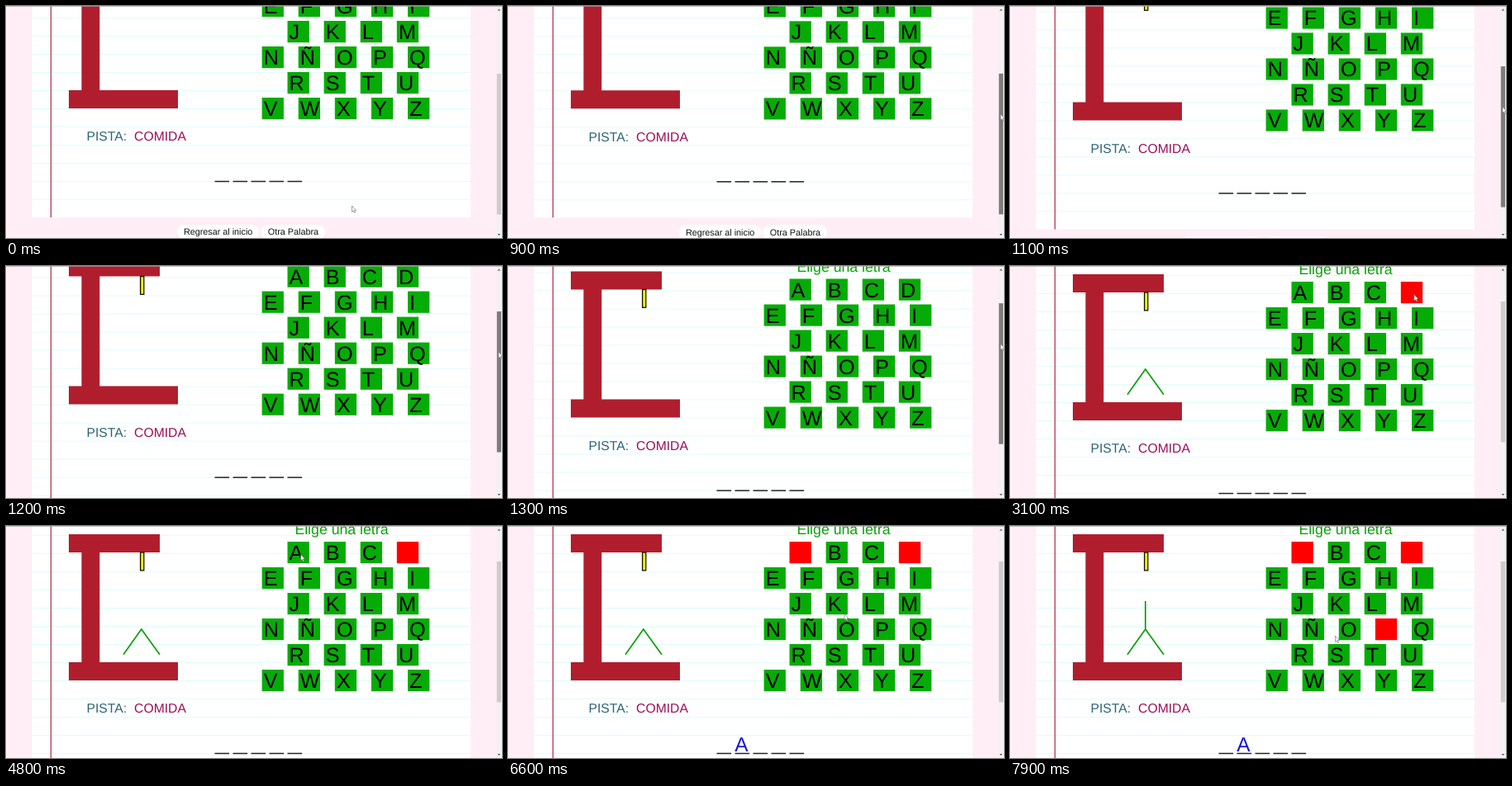
Write an HTML page that moves like this. It is 600 px wide and 281 px high and loops after 8 s.

```html
<!DOCTYPE html>
<html lang="es">
<head>
<meta charset="utf-8">
<title>Ahorcado</title>
<style>
  html, body { margin: 0; width: 100%; height: 100%; overflow: hidden; background: #ffeef5; }
  svg { display: block; width: 100vw; height: 100vh; }
  text { font-family: "Liberation Sans", Arial, sans-serif; white-space: pre; text-rendering: geometricPrecision; }
</style>
</head>
<body>
<svg viewBox="0 0 600 281">
  <rect width="600" height="281" fill="#ffeef5"/>
  <g id="page">
    <rect x="31.5" y="-20" width="530.5" height="339" fill="#fff"/>
    <g id="rules" stroke="#dffcfc"></g>
    <path d="M54.4-20V319" stroke="#b3304a" stroke-width="1.2"/>
    <path d="M76 10H186V32H113.3V165H208V187H76V165H91.4V32H76Z" fill="#b01e2e"/>
    <rect x="162.6" y="32" width="4.2" height="21.8" fill="#ffee1c" stroke="#111" stroke-width="1.3"/>
    <g fill="none" stroke="#0aa00a" stroke-width="1.7">
      <path id="legs" d="M142 155.7L163.8 125L186 155.7"/>
      <path id="torso" d="M163.8 91V125"/>
    </g>
    <text x="349.4" y="10" font-size="17.7" fill="#0aa00a">Elige una letra</text>
    <g id="keys" font-size="25.2"></g>
    <g font-size="15.7">
      <text x="97.5" y="226.3" fill="#2b6475">PISTA:</text>
      <text x="155.1" y="226.3" fill="#9b0d5a">COMIDA</text>
    </g>
    <g id="blanks" stroke="#222" stroke-width="1.5"></g>
    <text id="guess" x="274.3" y="272.8" font-size="24.4" fill="#1414dc">A</text>
    <g fill="#fff">
      <rect x="207" y="328" width="99" height="17.5" rx="8.7"/>
      <rect x="308" y="328" width="78" height="17.5" rx="8.7"/>
    </g>
    <g font-size="10.8" text-anchor="middle" fill="#111">
      <text x="256.6" y="340.3">Regresar al inicio</text>
      <text x="347.4" y="340.3">Otra Palabra</text>
    </g>
  </g>
  <rect x="592.8" width="7.2" height="281" fill="#f3f1f2"/>
  <path d="M594.6 5.4l1.8-2 1.8 2zM594.6 276l1.8 2 1.8-2z" fill="#555"/>
  <rect id="thumb" x="593.8" width="5.2" height="170.5"/>
  <rect width="600" height=".7" fill="#a5a2a3"/>
  <path id="cursor" d="M0 0V7.4L1.7 6L2.9 8.6L4.1 8L2.9 5.5H5.1Z" fill="#fff" stroke="#666" stroke-width=".6"/>
</svg>
<script>
const $ = id => document.getElementById(id);
const LOOP = 8000, STEP = 100, SCROLL = 63;
const pickTimes = { D: 3100, A: 5100, P: 7500 };
const partTimes = { legs: pickTimes.D, guess: pickTimes.A, torso: pickTimes.P };

function add(parent, tag, attrs, text) {
  const node = document.createElementNS("http://www.w3.org/2000/svg", tag);
  for (const name in attrs) node.setAttribute(name, attrs[name]);
  if (text) node.textContent = text;
  parent.append(node);
  return node;
}

for (let y = 11.5; y < 319; y += 22) add($("rules"), "path", { d: `M31.5 ${y}H562` });
for (let i = 0; i < 5; i++) add($("blanks"), "path", { d: `M${252.5 + 22 * i} 275.5h17.6` });

const keys = {};
["ABCD", "EFGHI", "JKLM", "NÑOPQ", "RSTU", "VWXYZ"].forEach((row, r) => {
  [...row].forEach((letter, c) => {
    const x = (row.length === 4 ? 340.5 : 309.6) + 44.1 * c;
    const y = 19 + 31 * r;
    keys[letter] = {
      x, y,
      tile: add($("keys"), "rect", { x, y, width: 26.3, height: 26.2 }),
      label: add($("keys"), "text", { x: x + 2.1, y: y + 22 }, letter)
    };
  });
});

const clamp = v => Math.min(1, Math.max(0, v));
const show = (node, on) => node.setAttribute("visibility", on ? "visible" : "hidden");

// Dragging the scrollbar follows an S-curve.
const scrollAt = t => -SCROLL / (1 + Math.exp((t - 1160) / 49.4));
const thumbAt = t => 43 - scrollAt(t) * 0.62;

function cursorAt(t) {
  let x = 418.5, y = 242;
  const move = (start, end, toX, toY) => {
    const k = clamp((t - start) / (end - start));
    x += (toX - x) * k;
    y += (toY - y) * k;
  };
  const moveToKey = (start, end, { x, y }) => move(start, end, x + 16, y + 15.5);

  move(0, 500, 595.8, thumbAt(t) + 49);
  moveToKey(1500, 2300, keys.D);
  move(3500, 4100, 420, 120);
  moveToKey(4100, 4800, keys.A);
  move(5800, 6600, 407, 106.5);
  moveToKey(6700, 7200, keys.P);
  move(7600, 7900, 393.5, 133);
  return [x, y];
}

function draw(t) {
  const dragging = t >= 600 && t < 1600;
  $("page").setAttribute("transform", `translate(0 ${scrollAt(t)})`);
  $("thumb").setAttribute("y", thumbAt(t));
  $("thumb").setAttribute("fill", dragging ? "#7c7c7c" : "#cdcbcc");
  $("cursor").setAttribute("transform", `translate(${cursorAt(t)})`);

  for (const letter in keys) {
    const used = t >= pickTimes[letter];
    keys[letter].tile.setAttribute("fill", used ? "#ff0000" : "#06ac06");
    show(keys[letter].label, !used);
  }
  for (const id in partTimes) show($(id), t >= partTimes[id]);
}

function tick() {
  const t = performance.now() % LOOP;
  draw(Math.floor(t / STEP) * STEP);
  requestAnimationFrame(tick);
}
tick();
</script>
</body>
</html>
```
